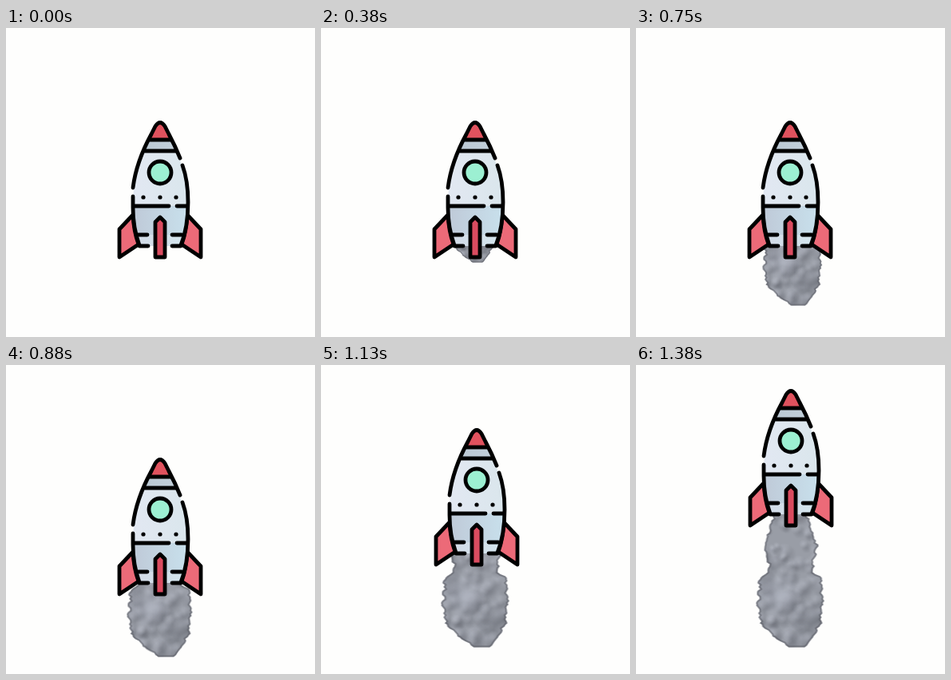
Animation, 387 px wide and 387 px high, one loop 1.51 s. Source, as an HTML page with a canvas:

```html
<!DOCTYPE html>
<html>
<head>
<meta charset="utf-8">
<style>
html, body { margin: 0; height: 100%; overflow: hidden; background: #fefefd; }
canvas { display: block; }
</style>
</head>
<body>
<canvas id="stage" width="387" height="387"></canvas>
<script>
const ctx = document.getElementById('stage').getContext('2d');
const LOOP = 1510, INK = '#000', PAPER = '#fefefd';

let seed = 11;
function rnd() {
  seed = (seed * 16807) % 2147483647;
  return seed / 2147483647;
}
const spread = r => (rnd() - 0.5) * 2 * r;

// Half width of the smoke column at a few heights around the big cloud's middle
const profile = [[-108, 21], [-66, 33], [-36, 27], [-25, 39], [8, 41], [32, 37], [48, 24], [61, 9]];

function edge(side) {
  const out = [];
  for (let i = 1; i < profile.length; i++) {
    const [y0, w0] = profile[i - 1], [y1, w1] = profile[i];
    for (let y = y0; y < y1; y += 2.5) {
      const w = w0 + (w1 - w0) * (y - y0) / (y1 - y0);
      const lean = Math.max(0, y - 30) * 0.27;
      out.push([lean + side * (w + Math.sin(y * 0.45 + side) + spread(1.6)), y]);
    }
  }
  return out;
}

function puff(c, x, y, r, rgb, alpha) {
  const g = c.createRadialGradient(x, y, 0, x, y, r);
  g.addColorStop(0, `rgba(${rgb},${alpha})`);
  g.addColorStop(1, `rgba(${rgb},0)`);
  c.fillStyle = g;
  c.fillRect(x - r, y - r, 2 * r, 2 * r);
}

function makeSmoke() {
  const cv = document.createElement('canvas');
  cv.width = 100;
  cv.height = 180;
  const c = cv.getContext('2d');
  c.translate(50, 112);
  const shape = new Path2D();
  for (const [x, y] of [...edge(-1), ...edge(1).reverse()]) shape.lineTo(x, y);
  shape.closePath();
  c.clip(shape);
  c.fillStyle = '#999da6';
  c.fillRect(-50, -112, 100, 180);
  for (let i = 0; i < 110; i++) {
    const x = spread(40), y = -108 + 170 * rnd();
    const r = (y < -30 ? 5 : 8) + 7 * rnd();
    puff(c, x + 2, y + 3, r, '95,98,107', 0.34);
    puff(c, x - 2, y - 2, r * 0.8, '190,194,205', 0.45);
  }
  puff(c, -14, -6, 28, '184,189,202', 0.5);
  puff(c, 26, 30, 34, '118,122,130', 0.5);
  c.strokeStyle = 'rgba(85,87,95,.5)';
  c.lineWidth = 4;
  c.stroke(shape);
  return cv;
}
const smoke = makeSmoke();

const hull = new Path2D('M187 123Q193 114 199 123L204 133Q223 168 228 211Q228 244 219 273H167Q158 244 159 211Q163 168 182 133Z');
const outline = new Path2D('M159 200Q163 168 182 133L187 123Q193 114 199 123L204 133Q212 148 218 163M221 172Q228 191 228 218Q228 250 219 272M159 211V225Q159 250 167 272');
const bars = new Path2D('M180 140H206M174 154H213M160 223H204M214 223H227M165 259H177M208 259H220M167 273H178M208 273H219');
const fins = new Path2D('M159 234L142 252V287L166 271Q160 255 159 234ZM227 234L244 252V287L220 271Q226 255 227 234Z');
const keel = new Path2D('M187 287V243L193 237L199 243V287Z');

function paint(path, fill) {
  ctx.fillStyle = fill;
  ctx.fill(path);
  ctx.stroke(path);
}

function disc(x, y, r) {
  const p = new Path2D();
  p.arc(x, y, r, 0, 7);
  return p;
}

function band(y, h, left, right = left) {
  const g = ctx.createLinearGradient(160, 0, 228, 0);
  g.addColorStop(0, left);
  g.addColorStop(1, right);
  ctx.fillStyle = g;
  ctx.fillRect(155, y, 77, h);
}

function drawRocket(dx, dy) {
  ctx.save();
  ctx.translate(dx, dy);
  ctx.lineWidth = 4.8;
  ctx.lineJoin = ctx.lineCap = 'round';
  ctx.strokeStyle = INK;
  paint(fins, '#ec6a78');

  ctx.save();
  ctx.clip(hull);
  band(113, 27, '#e0525e');
  band(140, 14, '#b9c6d2', '#c4d2dc');
  band(154, 69, '#e2e8f2', '#dae6ec');
  band(223, 36, '#bfcad8', '#c8e0ec');
  band(259, 15, '#d2dae6', '#d4e6ee');
  ctx.restore();

  ctx.stroke(outline);
  ctx.stroke(bars);
  paint(disc(193, 181, 14), '#9cf0d2');
  ctx.fillStyle = INK;
  for (const x of [172, 193, 213]) ctx.fill(disc(x, 212, 2.6));
  paint(keel, '#da4c60');
  ctx.restore();
}

// The cloud grows and sinks until lift-off, then hangs still
function drawSmoke(n, floor) {
  const s = Math.min(1, 0.35 + 0.0875 * n);
  const flying = n > 8;
  const x = flying ? 193.5 : 194 + 3 * Math.sin((n - 4) * Math.PI * 3 / 8);
  const y = flying ? 293 : 240 + 18 * n - 61 * s;
  ctx.save();
  ctx.beginPath();
  ctx.rect(0, floor, 387, 387);
  ctx.clip();
  ctx.drawImage(smoke, x - 50 * s, y - 112 * s, 100 * s, 180 * s);
  ctx.restore();
}

// Eight poses a second, each starting on a whole hundredth
function poseAt(t) {
  const n = Math.min(11, Math.floor(t / 125));
  return Math.round(n * 12.5) * 10 > t ? n - 1 : n;
}

function frame(now) {
  const n = poseAt(now % LOOP);
  const shake = n < 4 ? -8 * Math.sin(n * Math.PI * 2 / 3) : 0;
  const sway = n > 8 ? (12 - n) * 0.6 : shake;
  const lift = Math.round(Math.max(0, 24.5 * (n - 7.5)));
  ctx.fillStyle = PAPER;
  ctx.fillRect(0, 0, 387, 387);
  if (n > 2) drawSmoke(n, 272 - lift);
  drawRocket(Math.round(sway), -lift);
  requestAnimationFrame(frame);
}
frame(0);
</script>
</body>
</html>
```
